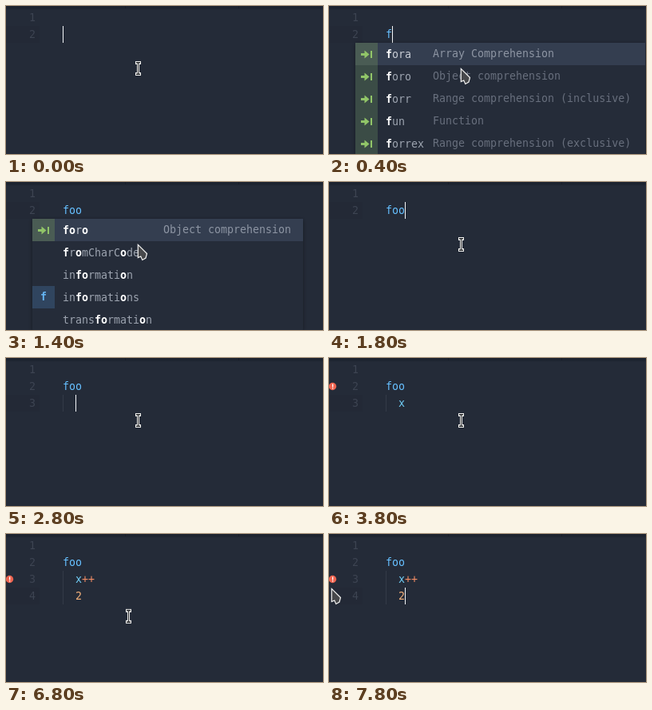
Animation of 397x185 px, one loop 8 s. Source, as an HTML page with a canvas:

```html
<!DOCTYPE html>
<html lang="en">
<head>
<meta charset="utf-8">
<title>Editor completion</title>
<style>
  html, body { margin: 0; width: 100%; height: 100%; overflow: hidden; background: #242b38; }
  canvas { display: block; }
</style>
</head>
<body>
<canvas id="stage" width="397" height="185"></canvas>
<script>
const ctx = document.getElementById('stage').getContext('2d');
const LOOP = 8000, STEP = 200, BLINK = 360, LINT_DELAY = 400;
const CHAR = 8, LINE = 21, LEFT = 71, TOP = 4;
const FONT = '13.3px "DejaVu Sans Mono", monospace';

const keystrokes = [
  [0, '\n'], [400, 'f'], [800, 'o'], [1000, 'o'], [2200, '\n'], [2800, '  '],
  [3400, 'x'], [4200, '+'], [4400, '+'], [4800, '\n  '], [5600, '2']
];

const snippets = {
  fora: 'Array Comprehension',
  foro: 'Object comprehension',
  forr: 'Range comprehension (inclusive)',
  fun: 'Function',
  forrex: 'Range comprehension (exclusive)'
};

const popups = [
  { from: 400, to: 800, query: 'f', right: 396, noteX: 130, names: 'fora foro forr fun forrex' },
  { from: 800, to: 1200, query: 'fo', right: 396, noteX: 130, names: 'fora foro forr forrex' },
  { from: 1200, to: 1800, query: 'foo', right: 372, noteX: 197,
    names: 'foro fromCharCode information informations transformation' }
];

const textAt = t => keystrokes.filter(([time]) => time <= t).map(([, keys]) => keys).join('');
const lineTop = index => TOP + index * LINE;

function tokenColor(letter) {
  if (letter === '+') return '#f08c65';
  if (letter === '2') return '#f2b07a';
  return letter === 'x' ? '#70ccf4' : '#66c0ff';
}

function rect(color, x, y, w, h) {
  ctx.fillStyle = color;
  ctx.fillRect(x, y, w, h);
}

function text(value, x, y, color, bold) {
  ctx.font = (bold ? 'bold ' : '') + FONT;
  ctx.fillStyle = color;
  ctx.fillText(value, x, y);
}

function polygon(points, fill, stroke) {
  ctx.beginPath();
  points.forEach(([x, y]) => ctx.lineTo(x, y));
  ctx.closePath();
  ctx.fillStyle = fill;
  ctx.fill();
  if (stroke) {
    ctx.strokeStyle = stroke;
    ctx.lineWidth = 1.2;
    ctx.stroke();
  }
}

function drawError(y) {
  ctx.beginPath();
  ctx.arc(4.5, y, 4.7, 0, Math.PI * 2);
  ctx.fillStyle = '#ee6450';
  ctx.fill();
  rect('#fff', 4, y - 3, 1.3, 4);
  rect('#fff', 4, y + 1.8, 1.3, 1.3);
}

function drawEditor(t) {
  const lines = textAt(t).split('\n');
  const current = lines.length - 1;

  rect('#242b38', 0, 0, 397, 185);
  const shade = ctx.createLinearGradient(0, 0, 0, 5);
  shade.addColorStop(0, '#1c222e');
  shade.addColorStop(.6, '#1d2430');
  shade.addColorStop(1, '#242b38');
  rect(shade, 0, 0, 397, 5);
  for (const x of [149, 291]) rect('#181e29', x, 0, 1, 3);
  rect('rgba(0,0,0,.035)', 0, lineTop(current), 42, LINE);

  lines.forEach((line, i) => {
    const y = lineTop(i);
    text(i + 1, 29, y + 15, '#3d4452');
    if (line.startsWith('  ')) rect('#343b48', LEFT, y, 1, LINE);
    [...line].forEach((letter, col) => text(letter, LEFT + col * CHAR, y + 15, tokenColor(letter)));
  });

  const lastKey = keystrokes.findLast(([time]) => time <= t)[0];
  if (Math.floor((t - lastKey) / BLINK) % 2 === 0) {
    rect('#f4f6f9', LEFT + lines[current].length * CHAR, lineTop(current), 1, LINE);
  }

  // The linter flags the line above the one being typed.
  const linted = textAt(t - LINT_DELAY);
  if (linted.includes('x')) drawError(lineTop(linted.split('\n').length - 2) + LINE / 2);
}

function drawSnippetIcon(y, selected) {
  const green = '#91c568';
  rect(selected ? '#4a5c54' : '#3b4c46', 33, y, 28, 28);
  rect(green, 40, y + 13, 5, 3);
  polygon([[44.5, y + 9.5], [50.5, y + 14.5], [44.5, y + 19.5]], green);
  rect(green, 52, y + 10, 2, 9);
}

function drawSuggestion(name, index, { query, right, noteX }) {
  const y = 46 + index * 28, selected = index === 0;
  const note = snippets[name];
  if (selected) rect('#343e50', 33, y, right - 33, 28);
  if (note) {
    drawSnippetIcon(y, selected);
    text(note, noteX, y + 18, selected ? '#8d95a3' : '#686f7d');
  } else if (name === 'informations') {
    rect('#30455f', 33, y, 28, 28);
    text('f', 43, y + 18, '#65b5f3', true);
  }
  let matched = 0;
  [...name].forEach((letter, i) => {
    const hit = letter === query[matched];
    if (hit) matched++;
    text(letter, LEFT + i * CHAR, y + 19, hit ? '#fff' : selected ? '#c8cdd5' : '#9da4b0', hit);
  });
}

function drawPopup(popup) {
  const names = popup.names.split(' ');
  ctx.save();
  ctx.shadowColor = 'rgba(0,0,0,.4)';
  ctx.shadowBlur = 5;
  ctx.shadowOffsetY = 1;
  ctx.beginPath();
  ctx.roundRect(33, 46, popup.right - 33, names.length * 28, 2);
  ctx.fillStyle = '#252c39';
  ctx.fill();
  ctx.restore();
  names.forEach((name, i) => drawSuggestion(name, i, popup));
}

function mouseAt(t) {
  const u = Math.max(0, (t - 6600) / 1200);
  const ease = u * u * (3 - 2 * u);
  return [165 - 162 * ease, 78 - 10 * u + 53 * Math.sin(Math.PI * u)];
}

function drawArrow(x, y) {
  const outline = [[.3, .4], [.3, 16.5], [3.8, 15], [5.8, 19.5], [10, 17], [11.5, 11.5]];
  polygon(outline.map(([dx, dy]) => [x + dx, y + dy]), '#47484b', '#f2f2f0');
}

function drawBeam(x, y) {
  const light = '#f4f4f2', dark = '#242629';
  for (const side of [-9, 5]) rect(light, x - 3, y + side, 7, 4);
  rect(light, x - 1, y - 6, 3, 12);
  for (const side of [-8, 6.5]) rect(dark, x - 2, y + side, 5, 1.5);
  rect(dark, x, y - 8, 1, 16);
}

function draw(t) {
  drawEditor(t);
  const popup = popups.find(p => p.from <= t && t < p.to);
  if (popup) drawPopup(popup);
  const [x, y] = mouseAt(t);
  (popup || x < 45 ? drawArrow : drawBeam)(x, y);
}

const start = performance.now();
function tick() {
  const t = (performance.now() - start) % LOOP;
  draw(Math.floor(t / STEP) * STEP);
  requestAnimationFrame(tick);
}
tick();
</script>
</body>
</html>
```
